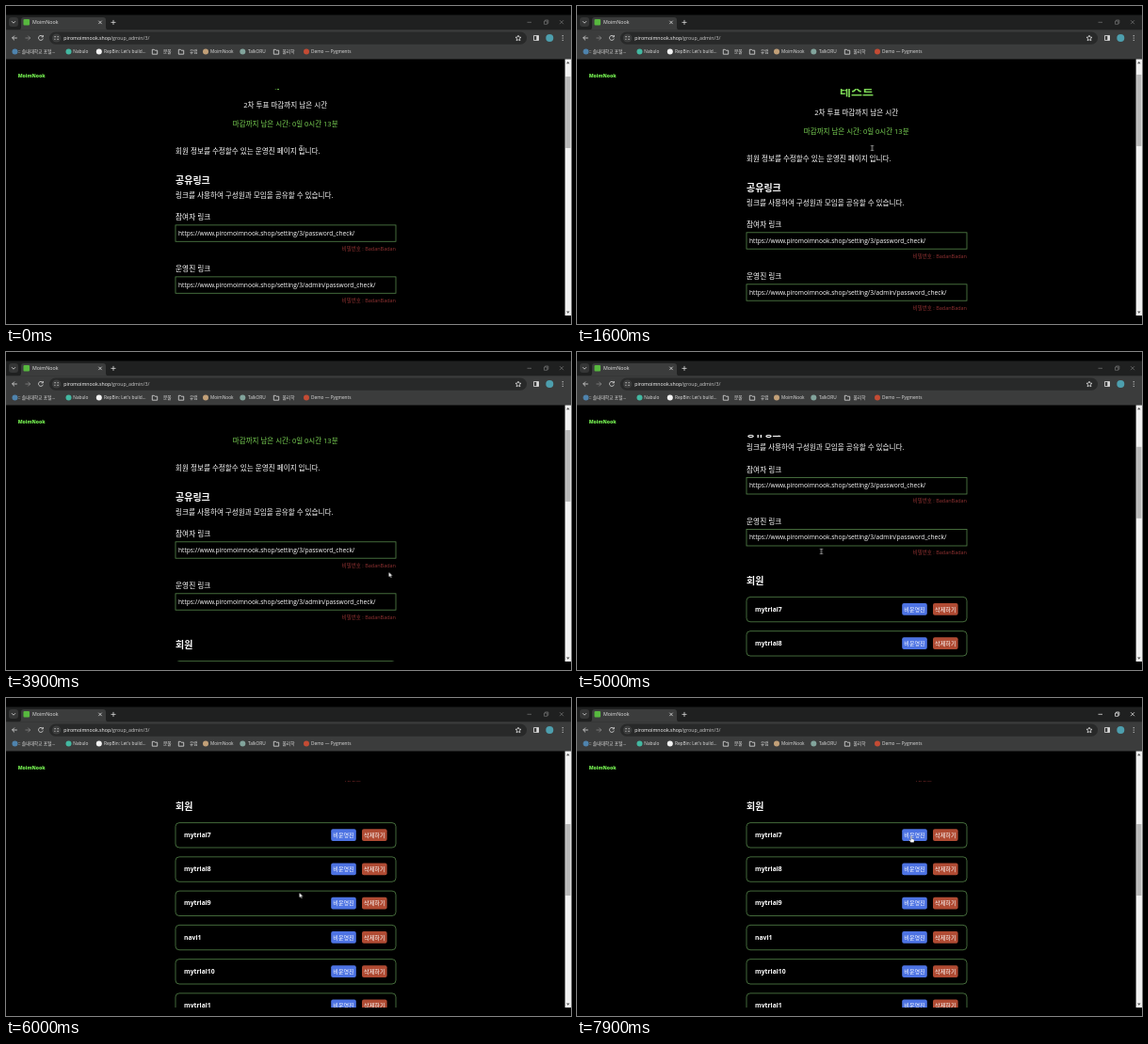
Recreate the animation shown at these times as an HTML page. Size 600 by 338 pixels, loop 8 s.

```html
<!DOCTYPE html>
<html lang="ko">
<head>
<meta charset="utf-8">
<title>Group admin</title>
<style>
@property --scroll { syntax: '<length>'; inherits: true; initial-value: 0px; }
html, body { margin: 0; width: 100%; height: 100%; overflow: hidden; background: #000; }
svg {
  display: block; width: 600px; height: 338px; fill: #fff;
  font-family: 'Open Sans', 'Noto Sans CJK KR', 'Noto Sans CJK', sans-serif;
  animation: scroll 8s linear infinite;
}
text { white-space: pre; }
.content { transform: translateY(calc(var(--scroll) * -1)); }
.thumb { transform: translateY(calc(var(--scroll) * .26)); }
.line { fill: none; stroke: #ddd; stroke-width: .8; }
.box { fill: #000; stroke: #55854a; stroke-width: .8; }
.controls { animation: focus 8s step-end infinite; }
.pointer { animation: move 8s linear infinite; }
.beam { animation: beam 8s step-end infinite; }
.arrow { animation: arrow 8s step-end infinite; }
.hand { animation: hand 8s step-end infinite; }

@keyframes scroll {
  0% { --scroll: 0px; }
  1.3%, 39% { --scroll: -8px; animation-timing-function: ease-in-out; }
  41.5%, 59.3% { --scroll: 31px; }
  60.9% { --scroll: 70px; }
  62.5% { --scroll: 99px; }
  63.1% { --scroll: 109px; }
  66% { --scroll: 148px; }
  69% { --scroll: 187px; }
  72%, 100% { --scroll: 227px; }
}
@keyframes move {
  0%, 23% { transform: translate(313.5px, 151px); animation-timing-function: ease-in-out; }
  31%, 36% { transform: translate(364px, 134px); animation-timing-function: ease-in-out; }
  46%, 50% { transform: translate(406.5px, 234px); animation-timing-function: ease-in-out; }
  60%, 65% { transform: translate(259.5px, 212px); animation-timing-function: ease-in-out; }
  73%, 83% { transform: translate(311.5px, 207px); animation-timing-function: ease-in-out; }
  94%, 100% { transform: translate(355px, 147px); }
}
@keyframes beam {
  0% { opacity: 1; } 25% { opacity: 0; }
  56% { opacity: 1; } 67%, 100% { opacity: 0; }
}
@keyframes arrow {
  0% { opacity: 0; } 25% { opacity: 1; } 56% { opacity: 0; }
  67% { opacity: 1; } 91%, 100% { opacity: 0; }
}
@keyframes hand { 0% { opacity: 0; } 91%, 100% { opacity: 1; } }
@keyframes focus { 0% { opacity: .4; } 84%, 100% { opacity: 1; } }
</style>
</head>
<body>
<svg id="stage" viewBox="0 0 600 338" xmlns="http://www.w3.org/2000/svg"></svg>
<script>
const attrs = o => Object.entries(o).map(([k, v]) => `${k}="${v}"`).join(' ');
const rect = (x, y, width, height, fill, rx = 0, more = {}) =>
  `<rect ${attrs({ x, y, width, height, rx, ...(fill && { fill }), ...more })}/>`;
const dot = (cx, cy, r, fill) => `<circle ${attrs({ cx, cy, r, fill })}/>`;
const line = (d, more = {}) => `<path ${attrs({ class: 'line', d, ...more })}/>`;
// y is the visual middle of the text line
const text = (x, y, size, str, more = {}) =>
  `<text ${attrs({ x, y: y + size * .36, 'font-size': size, ...more })}>${str}</text>`;
const mid = { 'text-anchor': 'middle' };
const bold = { 'font-weight': 700 };

const BRAND = 'MoimNook';
const SITE = 'piromoimnook.shop';
const GREEN = '#7ed957';
const BAR = '#3b3c3c';

function tabStrip() {
  return rect(0, 9.5, 600, 16, '#1f2020') +
    rect(3, 12, 10, 10, '#353636', 3) + line('M6 16.2l2 2 2-2') +
    `<path d="M13 25.5q3 0 3-3V15q0-3 3-3H103q3 0 3 3v7.5q0 3 3 3z" fill="${BAR}"/>` +
    rect(18.5, 14, 6.5, 6.5, '#57b83f', 1) +
    text(28, 17.4, 5.3, BRAND, { fill: '#e4e4e4' }) +
    line('M98.3 15.7l3.4 3.4m0-3.4l-3.4 3.4M111.5 17.4h5M114 14.9v5') +
    `<g class="controls">${line('M553.5 17.3h4.5M571.5 16h3.3v3.3h-3.3zM572.5 16v-1h3.3v3.3h-1M588 15.2l4 4m0-4l-4 4')}</g>`;
}

function toolbar() {
  return rect(0, 25.2, 600, 31.3, BAR) +
    line('M11.8 34H6.6m2.4-2.4L6.6 34 9 36.4') +
    line('M20.5 34h5.2m-2.4-2.4l2.4 2.4-2.4 2.4', { opacity: .45 }) +
    line('M39 32.4a2.5 2.5 0 1 0 .4 2.2M39.4 31v1.9h-1.9') +
    rect(46, 27.5, 507, 13.2, '#282929', 6.6) +
    dot(53.6, 34, 4.6, '#3d3e3e') +
    line('M51.3 32.7h1.6m1.6 0h1.4M51.3 35.3h1.2m1.8 0h1.6') +
    text(61.3, 34, 5.25, `${SITE}<tspan fill="#c9c9c9">/group_admin/3/</tspan>`) +
    line('M544 31.2l.9 1.9 2.1.2-1.6 1.4.5 2.1-1.9-1.1-1.9 1.1.5-2.1-1.6-1.4 2.1-.2z', { 'stroke-width': .65 }) +
    line('M560.5 31.5h5v5h-5z') + rect(563.3, 31.5, 2.4, 5, '#ddd') +
    dot(577.3, 34, 4, '#4d9fae') +
    [31.7, 34, 36.3].map(y => dot(591.2, y, .6, '#ddd')).join('');
}

function bookmarks() {
  const items = [
    [9.5, '#4e83ad', 13, ':: 솔내대학교 포털...'],
    [66.5, '#43b8a1', 71.3, 'Nabulo'],
    [98.8, '#f2f2f2', 104, "RepBin: Let's build..."],
    [158, '', 167, '문풀'],
    [186, '', 195, '유럽'],
    [212, '#c2a078', 217, BRAND],
    [251.3, '#82a49c', 257, 'TalkORU'],
    [287, '', 293.5, '물리학'],
    [319, '#c34b34', 324, 'Demo — Pygments'],
  ];
  return items.map(([x, color, tx, label]) =>
    (color ? dot(x, 48.6, 3, color)
      : line(`M${x - 2.7} 46.3h2l.8.9h2.6v4h-5.4z`, { 'stroke-width': .7 })) +
    text(tx, 48.5, 4.75, label, { fill: '#dedede' })).join('');
}

function linkField(y, label, path) {
  return text(180, y, 7.7, label) +
    rect(180, y + 8.8, 234, 17.4, '', 0, { class: 'box' }) +
    text(183, y + 17.3, 6.64, `https://www.${SITE}/setting/3/${path}`) +
    text(414, y + 33.6, 5.5, '비밀번호 : BadanBadan', { 'text-anchor': 'end', fill: '#943333' });
}

function member(name, i) {
  const y = 359.6 + i * 36.25;
  const button = (x, color, label) =>
    rect(x, y + 6.7, 26.6, 12.6, color, 2) + text(x + 13.3, y + 13, 6.1, label, mid);
  return rect(180, y, 234, 26.4, '', 4, { class: 'box' }) +
    text(189, y + 12.8, 6.8, name, bold) +
    button(345.2, '#4d73e3', '비운영진') + button(378, '#b04b33', '삭제하기');
}

function content() {
  const names = ['mytrial7', 'mytrial8', 'mytrial9', 'navi1', 'mytrial10', 'mytrial1'];
  return text(297, 82, 13, '테스트', { ...mid, ...bold, fill: GREEN }) +
    text(296.7, 105, 7.6, '2차 투표 마감까지 남은 시간', mid) +
    text(296.7, 125, 7.5, '마감까지 남은 시간: 0일 0시간 13분', { ...mid, fill: GREEN }) +
    text(180, 154.5, 7.6, '회원 정보를 수정할수 있는 운영진 페이지 입니다.') +
    text(180, 185.5, 10, '공유링크', bold) +
    text(180, 200.8, 7.6, '링크를 사용하여 구성원과 모임을 공유할 수 있습니다.') +
    linkField(224, '참여자 링크', 'password_check/') +
    linkField(279, '운영진 링크', 'admin/password_check/') +
    text(180, 342.7, 10, '회원', bold) +
    names.map(member).join('');
}

function scrollbar() {
  return rect(593.6, 56.5, 6.4, 272.5, '#f1f1f1') +
    '<path d="M595 61.2l1.8-2.2 1.8 2.2zM595 324.5l1.8 2.2 1.8-2.2z" fill="#555"/>' +
    rect(594.2, 75, 5.2, 76, '#b9b9b9', 0, { class: 'thumb' });
}

function pointer() {
  return '<g class="pointer">' +
    line('M-1.4 -2.6h1l.4.4.4-.4h1M0 -2.2v4.4M-1.4 2.6h1l.4-.4.4.4h1', { class: 'line beam', stroke: '#fff', 'stroke-width': .7 }) +
    '<path class="arrow" d="M0 0v5.2l1.2-1.1.9 1.9.9-.4-.9-1.9h1.7z" stroke="#222" stroke-width=".25"/>' +
    '<path class="hand" d="M-.6 .4q.6-.8 1.2 0v2.3l2 .5q.7.3.6 1.1l-.5 2.2h-3.2l-1.9-2.4q.2-.9 1.1-.3l.7.6z" stroke="#222" stroke-width=".3"/>' +
    '</g>';
}

document.getElementById('stage').innerHTML =
  '<clipPath id="view"><rect x="0" y="88" width="593" height="241"/></clipPath>' +
  rect(0, 0, 600, 338, '#000') +
  `<g clip-path="url(#view)"><g class="content">${content()}</g></g>` +
  text(12.7, 74.3, 5.1, BRAND, { 'font-weight': 800, fill: '#74ee50' }) +
  tabStrip() + toolbar() + bookmarks() + scrollbar() + pointer();
</script>
</body>
</html>
```
